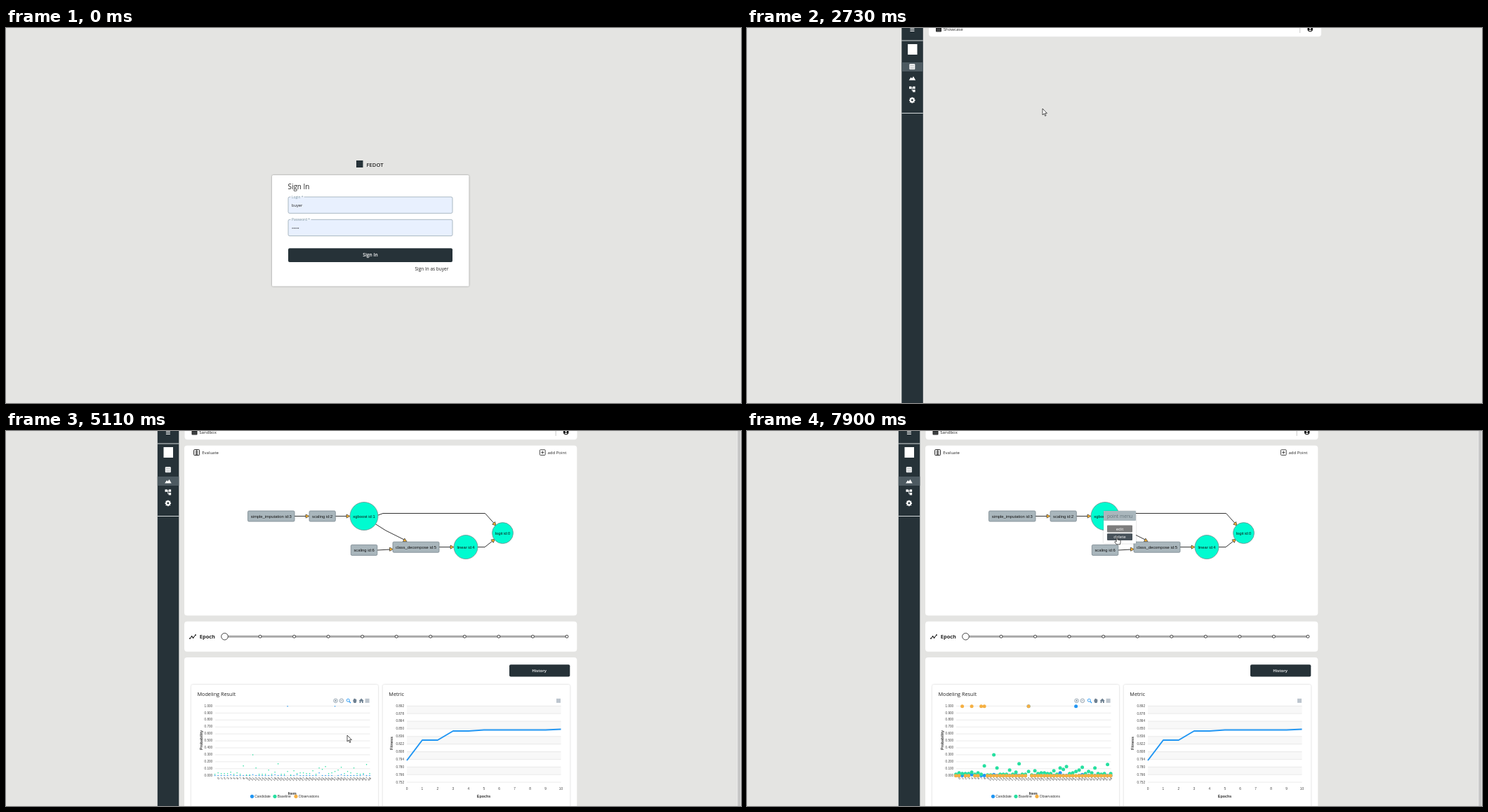
An HTML page for the animation above (8000 ms loop, 1047 px wide and 535 px high).

```html
<!DOCTYPE html>
<html lang="en">
<head>
<meta charset="utf-8">
<title>Pipeline editor walkthrough</title>
<style>
html, body { margin: 0; width: 100%; height: 100%; overflow: hidden; background: #e4e4e2; }
svg { display: block; width: 1047px; height: 535px; font-family: "Open Sans", sans-serif; }
.plain { font-family: "Liberation Sans", Arial, sans-serif; }
.shade { filter: drop-shadow(0 .8px 1px rgba(0,0,0,.4)); }
.soft { filter: drop-shadow(0 .4px 1px rgba(0,0,0,.22)); }
</style>
</head>
<body>
<svg id="stage" viewBox="0 0 1047 535" xmlns="http://www.w3.org/2000/svg"></svg>
<script>
const DARK = '#263238', LINE = '#c9c9c9', BLUE = '#2196f3', GREEN = '#26e0a0', ORANGE = '#f5b043';
const rect = (x, y, w, h, fill, rx = 0, more = '') =>
  `<rect x="${x}" y="${y}" width="${w}" height="${h}" fill="${fill}" rx="${rx}" ${more}/>`;
const text = (x, y, s, size, fill = '#222', more = '') =>
  `<text x="${x}" y="${y}" font-size="${size}" fill="${fill}" ${more}>${s}</text>`;
const path = (d, stroke, w = 1, fill = 'none', more = '') =>
  `<path d="${d}" stroke="${stroke}" stroke-width="${w}" fill="${fill}" ${more}/>`;
const shape = (d, fill, more = '') => `<path d="${d}" fill="${fill}" ${more}/>`;
const disc = (x, y, r, fill, more = '') => `<circle cx="${x}" cy="${y}" r="${r}" fill="${fill}" ${more}/>`;
const group = (s, more = '') => `<g ${more}>${s}</g>`;
const at = (x, y, s) => group(s, `transform="translate(${x} ${y})"`);
const range = (n, f) => Array.from({ length: n }, (_, i) => f(i)).join('');
const BOLD = 'font-weight="700"', SEMI = 'font-weight="600"';
const MID = 'text-anchor="middle"', END = 'text-anchor="end"', PLAIN = 'class="plain"';

let seed = 7;
const rnd = () => (seed = (seed * 16807) % 2147483647) / 2147483647;
const bell = () => rnd() + rnd() + rnd() + rnd() - 2;

// ---- sign-in page
function field(y, label, value, gap) {
  return rect(402, y, 234, 23.3, '#e8f0fe', 2, 'stroke="#98a9b4" stroke-width=".8"') +
    rect(405.5, y - 1, gap, 2, '#f4f8ff') + text(407, y + 2, label, 4.9, '#78909c') +
    text(407, y + 14.4, value, 5.7);
}
const login =
  rect(499, 189, 9.5, 10, DARK) + text(513.5, 197.5, 'FEDOT', 7.63, '#222', SEMI) +
  rect(379, 210, 280.5, 158.5, '#fff', 1.5, 'class="shade"') +
  text(401.5, 230, 'Sign In', 9.9) +
  field(241, 'Login *', 'buyer', 19) + field(273.3, 'Password *', '•••••', 29) +
  rect(402, 314.3, 234, 19.6, DARK, 2, 'id="enter"') +
  text(519, 326.4, 'Sign In', 6.7, '#fff', MID + SEMI) +
  text(582.5, 346, 'Sign In as buyer', 6.5);

// ---- shared frame
const tableIcon = c => rect(-4, -4, 8, 8, c, 1) +
  path('M-3 -1.8H3M-3 .6H3M-3 2.6H3', '#7d878c', .6);
const burger = (c, w = 3) => path(`M${-w} -2H${w}M${-w} 0H${w}M${-w} 2H${w}`, c, .9);
const user = disc(0, 0, 3.8, '#111') + disc(0, -1.1, 1.2, '#fff') + shape('M-2.2 2Q0 -.2 2.2 2Q0 3.6 -2.2 2Z', '#fff');
const gear = range(4, i => rect(-1.1, -4.2, 2.2, 8.4, '#fff', .4, `transform="rotate(${i * 45})"`)) +
  disc(0, 0, 3, '#fff') + disc(0, 0, 1.4, DARK);
const tree = rect(-4.2, -3.6, 3.4, 3.4, '#fff') + rect(1, -3.6, 3.4, 3.4, '#fff') + rect(1, 1, 3.4, 3.4, '#fff') +
  path('M-1 -2H1M0 -2V2.6H1', '#fff', .8);
const shell = (title, active) =>
  rect(220.3, 0, 30.5, 535, DARK) + rect(220.3, active, 30.5, 13, '#4d5a61') +
  path('M220.3 18H250.8M220.3 121.5H250.8', '#e8ecee', .9) +
  at(235.4, 2.5, burger('#fff')) + rect(229, 23, 13.5, 15, '#fff') +
  at(235.3, 55.3, tableIcon('#fff')) +
  shape('M230.6 74.4L233.6 70.2L235 72L237 69L240.2 74.4Z', '#fff') +
  at(235.2, 87, tree) + at(235.3, 103, gear) +
  rect(259, -10, 559, 22.3, '#fff', 4) + at(273, 1.5, tableIcon('#222')) +
  text(279.8, 4, title, 6.05) + path('M787.7 0V7', '#bbb', .8) + at(802.2, 1.6, user);

// ---- case pictures
function scatter() {
  let dark = '', red = '';
  for (let i = 0; i < 1500; i++) dark += `M${(298 + rnd() * 101).toFixed(1)} ${(112.5 + bell() * 11).toFixed(1)}h.7`;
  for (let i = 0; i < 34; i++) red += `M${(299 + rnd() * 99).toFixed(1)} ${(121 + bell() * 9).toFixed(1)}h.9`;
  return path(dark, '#2b2b2b', .65) + path(red, '#e53935', .9);
}
const people = [['Abel', '0.18'], ['Cora', '0.45'], ['Lenny', '0.13'], ['Rita', '0.06'], ['Wendell', '0.00'], ['Jolanda', '0.02']];
const credit =
  rect(294, 92.5, 107, 44, '#fff', 0, 'stroke="#999" stroke-width=".5"') + scatter() +
  range(4, i => text(298 + i * 31, 141.5, i * 5000, 2.8, '#555', MID)) +
  range(4, i => text(290, 96 + i * 12, 600 - i * 100, 2.6, '#555', `${MID} transform="rotate(-90 290 ${96 + i * 12})"`)) +
  text(347, 146.5, 'Profile', 3.2, '#222', BOLD + MID) +
  text(285, 115, 'Score', 3.2, '#222', BOLD + MID + ' transform="rotate(-90 285 115)"') +
  rect(409, 93, 41, 43.5, '#fff', 0, 'stroke="#555" stroke-width=".6"') +
  path('M409 102.5H450M424.5 93V136.5' + range(5, i => `M409 ${108.2 + i * 5.7}H450`), '#777', .4) +
  text(416.7, 99, 'Client', 2.9, '#222', BOLD + MID) +
  text(437.2, 97, 'Probability of', 2.6, '#222', BOLD + MID) + text(437.2, 100.6, 'non-repayment', 2.6, '#222', BOLD + MID) +
  people.map(([n, v], i) => text(411, 106.7 + i * 5.7, n, 3.6) + text(437, 106.7 + i * 5.7, v, 3.6, '#222', MID)).join('') +
  path('M460.5 113V105', '#e53935', 1.4) + shape('M457.5 106L460.5 101.5L463.5 106Z', '#e53935') +
  path('M451 114.3H480', '#9c6fae', .7) +
  path('M460.5 116V128', '#8bc34a', 1.4) + shape('M457.5 127.5L460.5 132L463.5 127.5Z', '#8bc34a') +
  text(465.5, 107, 'Denial', 4.6, '#e53935', BOLD + ' font-style="italic"') +
  text(463, 118.3, 'ρ*=0.16', 4.4, '#9c6fae') + text(455.5, 136.2, 'Approval', 4.6, '#7cb342');

const steel = '#3f77a8';
const blobs = range(46, i => {
  const x = 70 + rnd() * 50, y = 109 - (x - 70) * .12 + bell() * 7;
  return disc(x.toFixed(1), y.toFixed(1), 2.6, ['#e53920', '#3f8f3a', '#c6401c', '#57a83a'][i % 4]);
});
const oil =
  rect(3.5, 79, 153, 45, '#dbe4a6', 2) +
  path('M9 86L26 83M12 102L16 85L20 102M9 102H28M25 84V101M13 95H19', steel, 1.7) +
  path('M27 113H48L45 120H30ZM31 112V104H36V112M40 112V101L48 105', steel, 1.4, '#6c93ad') +
  rect(47.5, 84, 12, 16, steel, 1.5) + path('M47 89H60M47 95H60', '#b8d2e2', .8) +
  disc(58, 85.5, 3, 'none', 'stroke="#d84a3a" stroke-width="1"') +
  shape('M64 116L76 104L94 94L122 99L118 109L98 114L80 121Z', '#8d3c24') + blobs +
  path('M124 108H132', '#555', 1) +
  range(4, i => rect(137 + i * 4, 114 - i * 3.4 + (i == 2 ? 4 : 0), 2.8, 5.5 + i * 3.4 - (i == 2 ? 4 : 0), '#5aa75a')) +
  path('M136 120H154M137 110L142 104L147 106L153 97', '#3f7f7a', 1) +
  text(69, 88.5, 'Oil modeling', 12, '#1d2553', BOLD + ' font-family="Noto Serif, serif"');

const wave = 'M8 182' + range(52, i => `L${8.6 + i * 1.08} ${(180 + Math.sin(i * .32) * 3 + bell() * 9).toFixed(1)}`);
const ocean =
  rect(3.5, 153.5, 153, 45, '#fff', 2) + rect(50, 154, 87, 44, '#fbdcd8') +
  shape('M50 154H104L97 160L83 162L74 172L66 165L58 168L50 162Z', '#b9bcc0') +
  shape('M72 168L82 161L98 162L107 168L104 181L90 186L77 181Z', '#f28c86') +
  shape('M110 166L137 161V184L122 180Z', '#f59a94') +
  shape('M104 154H137V160L122 168L112 163ZM69 178L76 176L80 183L75 191L70 187ZM107 173L113 170L118 177L113 186L109 181Z', '#b9bcc0') +
  shape('M28 192Q52 186 76 189T137 188V198H28Z', '#2b43d6') + shape('M28 195Q80 191 137 194V198H28Z', '#b9bcc0') +
  rect(5, 165, 58, 27, '#fff', 0, 'opacity=".75"') + path(wave, '#1f77b4', .9) +
  text(62, 184, '?', 13, '#f0776f') +
  rect(140, 154, 5.5, 42, 'url(#heat)') +
  range(5, i => text(147, 157.5 + i * 9, ['2.0', '1.0', '0.0', '-1.0', '-2.0'][i], 2.6, '#555'));

const art = [group(credit, 'transform="translate(-206 -52.4) scale(.74 .66)"'), at(0, -75, oil), at(0, -150, ocean)];
const names = ['Credit scoring case', 'Oil production prediction', 'Metocean forecasting case'];
const caseCard = (i, x, y) => at(x, y,
  rect(0, 0, 160, 69, '#e0e0e0', 4) + rect(3.5, 3.2, 153, 45.8, '#fff', 3) + art[i] +
  text(3.4, 60.4, names[i], 5.96) + rect(130, 52, 26.6, 12.8, '#1a2429', 2) +
  text(143.3, 60.6, 'Expand', 5.7, '#fff', MID + SEMI));

// ---- showcase page
const cards = f => names.map((_, i) => caseCard(i, ...f(i))).join('');
const caseHead = (x, w, h) => rect(x, 20.7, w, h, '#fff', 4) + text(x + 10, 38.6, 'Case', 7.55, '#222', BOLD) +
  path(`M${x + 10} 48.3H${x + w - 10}`, LINE, .8);
const stats = [['n_models', 2], ['n_levels', 2], ['n_features', 10], ['n_rows', 5464], ['ROCAUC', '0.839']];
const story = [
  'The purpose of credit scoring is to assess and possibly reduce the risk of a bank associated with lending clients. Risk minimization',
  'happens due to dividing potential borrowers into creditworthy and non-creditworthy borrowers. Behavioural scoring involves an',
  'assessment of creditworthiness based on information about the borrower, characterizing his behaviour and habits and obtained',
  'from various sources.'];
const details =
  rect(259, 20.7, 370, 208.3, '#fff', 4) + text(268.8, 38.6, 'Credit scoring case', 7.55, '#222', BOLD) +
  path('M269 48.3H619', LINE, .8) + rect(269, 58, 350, 161, '#dedede', 4) +
  text(274, 73, 'Model structure', 7.63) + text(534, 73, 'Model details', 7.63) +
  rect(274, 80, 253, 77, '#fff', 4) + credit + rect(534, 80, 80.3, 77, '#fff', 4) +
  stats.map(([k, v], i) => text(538, 89.8 + i * 11.6, k, 5.9) + text(611, 89.8 + i * 11.6, v, 5.9, '#222', END)).join('') +
  story.map((s, i) => text(274, 168.8 + i * 7.65, s, 5.45)).join('') +
  rect(571, 201, 46.5, 14.6, '#b0bec5', 2, 'id="edit"') +
  group(disc(594, 208, 8, '#546e7a'), 'id="ripple"') +
  text(594.4, 210.2, 'Edit in Sandbox', 5.5, '#263238', MID) +
  caseHead(636, 182, 264.6) + cards(i => [647, 56.8 + i * 75.2]);
const showcase = shell('Showcase', 49) +
  group(caseHead(259, 559, 37.3), 'id="empty"') +
  group(caseHead(259, 559, 115) + cards(i => [269 + i * 167, 56.8]), 'id="list"') +
  group(details, 'id="details"');

// ---- sandbox page (drawn at its final place)
const arrow = (x, y, a) => group(shape('M0 0L-5 -2.6V2.6Z', '#ffb52e', 'stroke="#333" stroke-width=".7"'),
  `transform="translate(${x} ${y}) rotate(${a})"`);
const box = (x, y, w, s) => rect(x, y, w, 15, '#a9b6bc', 1.5, 'stroke="#78868d" stroke-width=".8"') +
  text(x + w / 2, y + 9.8, s, 5.85, '#111', MID + PLAIN);
const node = (x, y, r, s) => disc(x, y, r, '#00fbd0', 'stroke="#7b8f8f" stroke-width=".8"') +
  text(x, y + 2.4, s, 5.8, '#111', MID + PLAIN);
const graph =
  path('M411 121.5H428M469 121.5H486M529 170L547 169M617 165.6H634M529 120.5L537 117.5H682.5L695 131.5M526 132.5L541 142L567 155M672 165.6H682L693 157', '#333', 1) +
  arrow(432, 121.5, 0) + arrow(490, 121.5, 0) + arrow(551.5, 168.7, 0) + arrow(638, 165.6, 0) +
  arrow(698, 135, 48) + arrow(571, 157.8, 28) + arrow(696.5, 154.2, -38) +
  box(344.5, 114, 66.5, 'simple_imputation id:3') + box(432, 114, 37.3, 'scaling id:2') +
  box(491.3, 162.4, 37.5, 'scaling id:6') + box(551, 158.2, 66, 'class_decompose id:5') +
  node(510, 121.5, 20, 'xgboost id:1') + node(655, 165.6, 17, 'linear id:4') + node(707.5, 145.6, 15, 'logit id:0');

const base = 491.7, colX = i => 297.6 + i * 4.5;
const epochX = i => 571 + i * 21.95;
const baseline = [2, 4, 3, 3, 3, 5, 2, 4, 2, 14, 1, 1, 30, 11, 2, 2, 2, 8, 2, 5, 17, 2, 2, 6, 1, 7, 3, 4, 4, 3,
  3, 7, 2, 11, 9, 13, 3, 4, 6, 8, 12, 3, 6, 4, 11, 3, 2, 3, 16, 3];
const ones = [2, 5, 8, 9, 23];
const marks = (cls, color, f) => group(baseline.map((v, i) =>
  `<circle cx="${colX(i)}" cy="${base - f(i, v) * .99}"/>`).join(''), `class="${cls}" fill="${color}"`);
const tick = (i, y, s) => text(epochX(i), y, s, 4.8, '#444', MID + PLAIN);
const legend = [[350.5, BLUE, 'Candidate'], [383, GREEN, 'Baseline'], [413, ORANGE, 'Observations']];
const tools =
  range(2, i => disc(469.5 + i * 8.4, 384.8, 2.8, 'none', 'stroke="#6e8192" stroke-width=".7"')) +
  path('M468 384.8H471M469.5 383.3V386.3M476.4 384.8H479.4', '#6e8192', .7) +
  disc(487.3, 384.2, 2, 'none', 'stroke="#2196f3" stroke-width=".9"') + path('M488.8 385.7L491 388', BLUE, 1.1) +
  shape('M494 384.5L495 384V382.3H496V381.8H497.3V382.3H498.4V383H499.3V386L498.4 388H495.6Z', '#6e8192') +
  shape('M502.6 385L506.2 381.6L509.8 385H508.8V388H507V385.8H505.4V388H503.6V385Z', '#6e8192') +
  at(514.6, 384.8, burger('#6e8192'));
const result =
  rect(264, 362, 266, 190, '#fff', 2, 'class="soft"') + text(272.4, 378, 'Modeling Result', 7.3) + tools +
  range(11, i => path(`M298 ${392.4 + i * 9.93}H518.5`, '#e3e3e3', .7) +
    text(294.2, 393.6 + i * 9.93, (1 - i / 10).toFixed(3), 4.65, '#444', END + PLAIN)) +
  text(279.5, 441, 'Probability', 5.4, '#333', BOLD + MID + PLAIN + ' transform="rotate(-90 279.5 441)"') +
  group(range(49, i => text(0, 0, i, 4.6, '#444', `${END} ${PLAIN} transform="translate(${304.5 + i * 4.5} 495.8) rotate(-45)"`)) +
    text(407.8, 518.6, 'Item', 5.9, '#333', BOLD + MID + PLAIN) +
    legend.map(([x, c, s]) => disc(x, 521.3, 2.6, c) + text(x + 3.8, 523, s, 4.95, '#333', PLAIN)).join('') +
    marks('dot', BLUE, i => i == 23 || i == 38 ? 100 : i == 33 ? 4 : i % 7 == 5 ? 1.5 : .2) +
    marks('dot', GREEN, (i, v) => v) +
    marks('late', ORANGE, i => ones.includes(i) ? 100 : 0), 'class="data"');
const metric =
  rect(536.8, 362, 266.5, 190, '#fff', 2, 'class="soft"') + text(545.3, 378, 'Metric', 7.3) +
  at(787, 384.8, burger('#6e8192')) +
  range(5, i => rect(571, 392.3 + i * 21.76, 219.5, 10.88, '#f8f8f8')) +
  range(11, i => path(`M571 ${392.3 + i * 10.88}H790.5`, '#e3e3e3', .7) +
    text(567, 393.7 + i * 10.88, (.892 - i * .014).toFixed(3), 4.65, '#444', END + PLAIN)) +
  text(551.3, 445.5, 'Fitness', 5.4, '#333', BOLD + MID + PLAIN + ' transform="rotate(-90 551.3 445.5)"') +
  group(range(11, i => tick(i, 511.6, i)) + text(680.6, 523, 'Epochs', 5.4, '#333', BOLD + MID + PLAIN) +
    path('', BLUE, 2, 'none', 'id="curve" stroke-linejoin="round"'), 'class="data"') +
  group(path('M0 392V501', '#b6b6b6', .7, 'none', 'id="cross" stroke-dasharray="2 2"') +
    group(rect(0, 415.6, 62.5, 25, '#fff', 2, 'class="soft" stroke="#ddd" stroke-width=".6"') +
      rect(.3, 416, 62, 10.5, '#eceff1', 1.5) + text(3.2, 423, '', 4.8, '#333', PLAIN + ' id="tipHead"') +
      disc(7.2, 434, 2.5, BLUE) + text(13.5, 435.8, '', 4.8, '#333', PLAIN + ' id="tipBody"'), 'id="tip"') +
    group(rect(-6.3, 502.3, 12.6, 13.2, '#eceff1', 1.5, 'stroke="#90a4ae" stroke-width=".7"') +
      text(0, 510.6, '', 4.8, '#444', MID + PLAIN + ' id="axisText"'), 'id="axisTip"'), 'id="hover"');
const menu =
  rect(508, 114, 46, 46.5, '#fff', 1, 'class="soft"') + rect(508, 114, 46, 14, '#a9b6bc', 1) +
  text(531, 123.6, 'point menu', 6.7, '#66757c', MID) +
  rect(513, 134.6, 36, 9.8, '#7d7d7d', 1) + text(531, 141.6, 'edit', 6, '#fff', MID) +
  rect(513, 146.2, 36, 9.8, '#7d7d7d', 1, 'id="del"') + text(531, 153.2, 'delete', 6, '#fff', MID);
const sandbox =
  at(-4.5, 0, shell('Sandbox', 65)) +
  rect(254, 20.7, 559.3, 242.6, '#fff', 4) +
  rect(267.6, 26.6, 8, 8, '#fff', 1, 'stroke="#222" stroke-width="1"') +
  path('M269.5 29H273.7M269.5 31H273.7M269.5 33H273.7M271.6 27V34', '#222', .8) +
  text(279.3, 32.8, 'Evaluate', 5.97) +
  rect(760.4, 26.7, 7.8, 7.8, '#fff', 1, 'stroke="#222" stroke-width=".8"') +
  path('M762.2 30.6H766.4M764.3 28.5V32.7', '#222', .8) + text(771.4, 32.8, 'add Point', 6.02) + graph +
  rect(254, 271.8, 559.3, 43, '#fff', 4) +
  path('M262 296L264.6 293L266.6 295L270 291', '#222', 1.1) +
  [[262, 296], [264.6, 293], [266.6, 295], [270, 291]].map(p => disc(...p, .9, '#222')).join('') +
  text(275.8, 295.8, 'Epoch', 7.45, '#222', BOLD) +
  rect(312, 291.7, 487, 3, '#a8a8a8') +
  range(10, i => disc(362 + i * 48.55, 293.2, 2, '#fff', 'stroke="#333" stroke-width=".9"')) +
  disc(311.5, 293.2, 4.8, '#fff', 'stroke="#333" stroke-width=".9"') +
  rect(254, 323, 559.3, 230, '#fff', 4) + rect(717, 333.2, 86.3, 17.2, DARK, 2) +
  text(759.6, 343.8, 'History', 5.95, '#fff', MID + SEMI) +
  result + metric + group(menu, 'id="menu"');

const pointer =
  group(shape('M0 0V9L2.1 7.1L3.6 10.5L5 9.9L3.5 6.6H6.4Z', '#fff', 'stroke="#111" stroke-width=".7"'), 'id="tipArrow"') +
  group(shape('M-.8 .4Q0 -.7 .8 .4V4L4.6 4.8Q5.6 5.2 5.2 7L4.4 10.8H-.6L-3.4 7Q-3.2 5.6 -.8 7Z', '#fff', 'stroke="#111" stroke-width=".7"'), 'id="hand"');

document.getElementById('stage').innerHTML =
  '<defs><linearGradient id="heat" x2="0" y2="1"><stop stop-color="#e01010"/><stop offset=".5" stop-color="#f6f2f6"/><stop offset="1" stop-color="#1020d0"/></linearGradient></defs>' +
  rect(0, 0, 1047, 535, '#e4e4e2') +
  group(login, 'id="login"') + group(showcase, 'id="showcase"') + group(sandbox, 'id="sandbox"') +
  group(rect(1041.6, 0, 5.4, 535, '#f1f1f1') + rect(1042.2, 0, 4.2, 535, '#c6c6c6'), 'id="scroll"') +
  group(pointer, 'id="pointer"');

// ---- motion
const $ = id => document.getElementById(id);
const all = s => document.querySelectorAll(s);
const show = (el, on) => el.setAttribute('visibility', on ? 'inherit' : 'hidden');
const set = (id, k, v) => $(id).setAttribute(k, v);
const clamp = v => Math.max(0, Math.min(1, v));
const ease = v => { v = clamp(v); return v * v * (3 - 2 * v); };

// linear track through [time, ...values]
function track(keys, t) {
  const n = keys.findIndex(k => k[0] > t);
  if (n === 0) return keys[0].slice(1);
  if (n < 0) return keys[keys.length - 1].slice(1);
  const a = keys[n - 1], b = keys[n], u = (t - a[0]) / (b[0] - a[0]);
  return a.slice(1).map((v, i) => v + (b[i + 1] - v) * u);
}
const route = [
  [90, 790, 513], [300, 700, 440], [600, 550, 350], [870, 494, 323], [1640, 494, 323],
  [1900, 460, 210], [2180, 421, 115], [2890, 421, 115], [3300, 455, 150], [3720, 545, 190], [4100, 594, 208],
  [4490, 594, 208], [4650, 590, 270], [4880, 560, 320], [5110, 486, 434], [5250, 490, 438], [5500, 580, 432],
  [5740, 695, 424], [5810, 730, 422], [5960, 786, 408], [6100, 770, 380], [6350, 600, 250], [6510, 503, 193],
  [6820, 504, 168], [7280, 504, 168], [7450, 514, 185], [7700, 525, 160], [7900, 527, 151]];
const tipRoute = [[5740, 606, 654], [5810, 650.4, 675.5], [5960, 796, 790]];
const fit = [470, 441, 441, 428, 428, 426.5, 426.5, 426.5, 426.5, 426.5, 425.6];

function draw(t) {
  const [x, y] = track(route, t);
  const page = t < 1400 ? 'login' : t < 4490 ? 'showcase' : 'sandbox';
  ['login', 'showcase', 'sandbox'].forEach(p => show($(p), p === page));

  const onEnter = t > 720 && t < 1400, onEdit = t > 4000 && t < 4490, onDelete = t > 7720;
  set('enter', 'fill', onEnter ? '#45555e' : DARK);
  show($('empty'), page === 'showcase' && t < 1720);
  show($('list'), page === 'showcase' && t >= 1720 && t < 2730);
  show($('details'), page === 'showcase' && t >= 2890);
  set('edit', 'fill', onEdit ? '#8ea1aa' : '#b0bec5');
  const r = clamp((t - 4330) / 160);
  set('ripple', 'opacity', r > 0 ? .45 : 0);
  $('ripple').firstChild.setAttribute('r', 3 + 7 * r);

  const settled = t >= 4570;
  set('sandbox', 'transform', `translate(${settled ? 0 : 4.5} 0)`);
  show($('scroll'), page === 'sandbox' && settled);
  all('.data').forEach(g => show(g, page === 'sandbox' && t >= 4880));
  const size = .8 + 1.7 * ease((t - 5130) / 450);
  all('.dot circle').forEach(c => c.setAttribute('r', size));
  all('.late circle').forEach(c => c.setAttribute('r', 2.5 * ease((t - 5150) / 450)));
  const rise = ease((t - 4840) / 250);
  set('curve', 'd', 'M' + fit.map((v, i) => `${epochX(i)} ${501 + (v - 501) * rise}`).join('L'));

  const hover = page === 'sandbox' && t >= 5740 && t < 6200;
  show($('hover'), hover);
  set('hover', 'opacity', 1 - clamp((t - 6060) / 140));
  if (hover) {
    const [tipX, axisX] = track(tipRoute, t);
    const i = t > 5960 ? 10 : Math.max(0, Math.min(10, Math.round((x - 571) / 21.95)));
    set('cross', 'transform', `translate(${epochX(i)} 0)`);
    set('tip', 'transform', `translate(${tipX} 0)`);
    set('axisTip', 'transform', `translate(${axisX} 0)`);
    $('tipHead').textContent = $('axisText').textContent = i;
    $('tipBody').textContent = 'Test sample:  ' + (i > 9 ? '0.850' : '0.849');
  }
  show($('menu'), page === 'sandbox' && t >= 7050);
  set('del', 'fill', onDelete ? '#48525a' : '#7d7d7d');

  const onExpand = t > 2120 && t < 2700;
  const hand = onEnter || onEdit || onDelete || onExpand;
  show($('pointer'), t >= 90);
  show($('tipArrow'), t >= 90 && !hand);
  show($('hand'), t >= 90 && hand);
  set('pointer', 'transform', `translate(${x} ${y})`);
}

const start = performance.now();
function loop() {
  draw((performance.now() - start) % 8000);
  requestAnimationFrame(loop);
}
loop();
</script>
</body>
</html>
```
